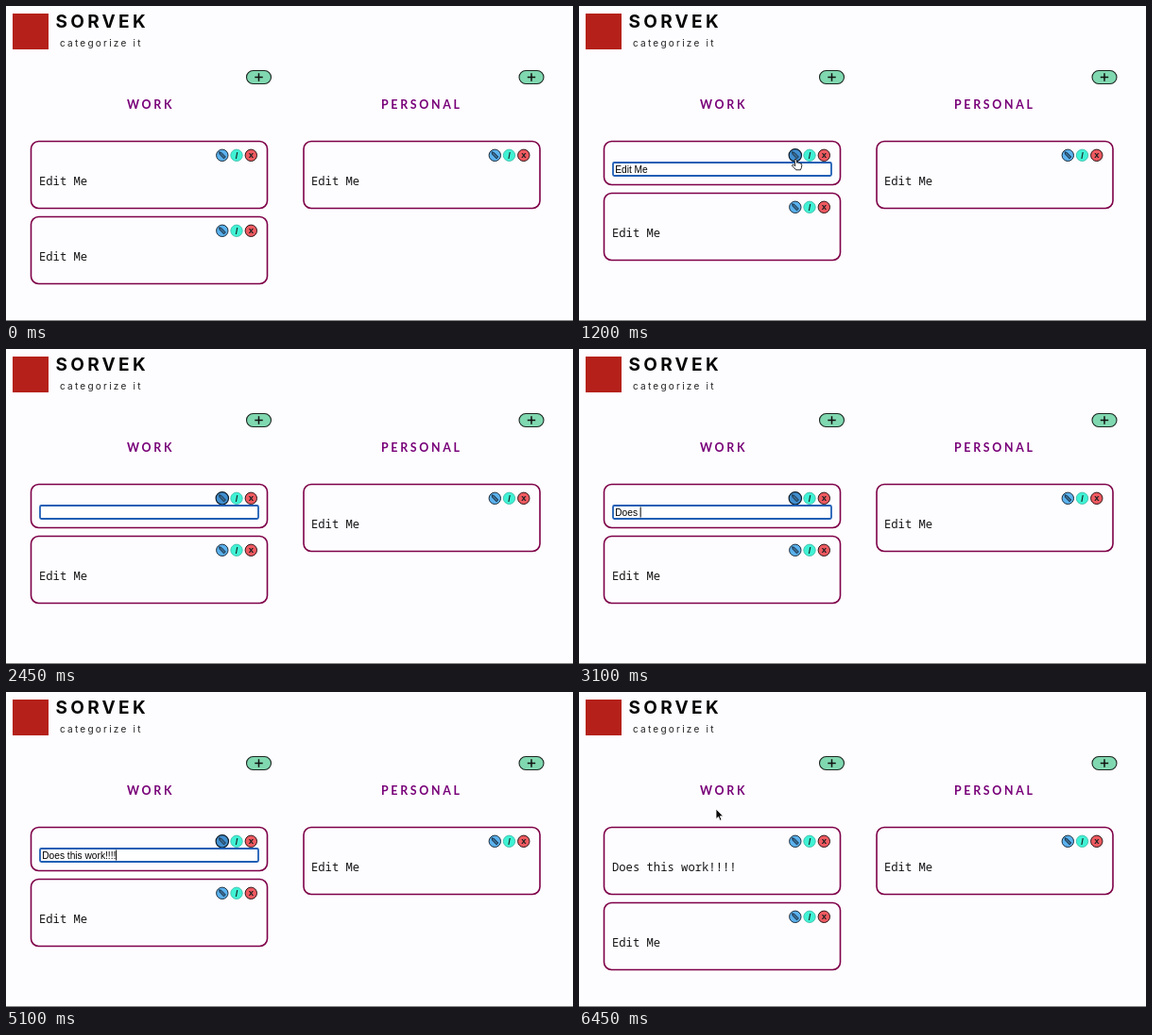
An HTML page for the animation above (6.5 s loop, 600 by 334 pixels).

```html
<!DOCTYPE html>
<html lang="en">
<head>
<meta charset="utf-8">
<title>Card board</title>
<style>
  html, body { margin: 0; height: 100%; overflow: hidden; background: #fdfcff; }
  svg { display: block; width: 600px; height: 334px; }
  .title { font: 700 19px Inter, sans-serif; letter-spacing: 3.3px; fill: #080808; }
  .tagline { font: 400 10px Inter, sans-serif; letter-spacing: 2.25px; fill: #222; }
  .heading { font: 700 12.4px Lato, sans-serif; letter-spacing: 2.7px; fill: #780078; }
  .note { font: 12.2px "Noto Sans Mono", monospace; fill: #161616; white-space: pre; }
  .typed { font: 10.2px "Liberation Sans", Arial, sans-serif; fill: #000; white-space: pre; }
  .icon { font: 700 9.5px "Liberation Sans", Arial, sans-serif; text-anchor: middle; fill: #182020; }
  .frame { fill: none; stroke: #7e0048; stroke-width: 1.6; }
</style>
</head>
<body>
<svg viewBox="0 0 600 334">
  <defs>
    <g id="add">
      <rect x=".5" y=".5" width="26" height="14" rx="7" fill="#80d8b0" stroke="#1c2622" stroke-width="1.1"/>
      <path d="M9.3 7.5h8.4M13.5 3.3v8.4" stroke="#111" stroke-width="1.5"/>
    </g>
    <g id="pencil">
      <path d="M-3.2-3.4L-2.6-1.2L2-.1" fill="none"/>
      <path d="M-3.3-3.6L-.8-2.9L3.6 1.7L1.7 3.6L-2.7-1Z" fill="#39698c" stroke="#14263a" stroke-width=".8"/>
    </g>
    <g id="tools">
      <circle r="6.2" fill="#5bb2ee" stroke="#1b2c3a"/>
      <use href="#pencil"/>
      <circle cx="15.2" r="6.2" fill="#40f2d4" stroke="#37b9a5" stroke-width=".8"/>
      <text class="icon" x="15.2" y="3.4">/</text>
      <circle cx="30.5" r="6.2" fill="#ee5a60" stroke="#2a1518"/>
      <text class="icon" x="30.5" y="2.8">x</text>
    </g>
  </defs>

  <rect x="7" y="8" width="38" height="38" fill="#b5211a"/>
  <text class="title" x="52.5" y="23">SORVEK</text>
  <text class="tagline" x="57" y="43">categorize it</text>
  <path d="M0 333.5H600" stroke="#858585"/>

  <use href="#add" x="254" y="68"/>
  <use href="#add" x="542.5" y="68"/>
  <text class="heading" x="128" y="108.5">WORK</text>
  <text class="heading" x="397" y="108.5">PERSONAL</text>

  <g transform="translate(26 143)">
    <rect id="firstFrame" class="frame" x=".5" y=".5" width="250" height="71" rx="8"/>
    <use href="#tools" x="202.8" y="15.3"/>
    <g id="active" transform="translate(202.8 15.3)">
      <circle r="6.7" fill="#418fd0" stroke="#12202c" stroke-width="1.2"/>
      <use href="#pencil"/>
    </g>
    <text id="note" class="note" x="9" y="47"></text>
    <g id="field">
      <rect x="10" y="23" width="231" height="14" rx="1.5" fill="#fff" stroke="#1f5fb5" stroke-width="1.8"/>
      <text id="typed" class="typed" x="12.2" y="33.5"></text>
      <path id="caret" d="M0 24.5v11" stroke="#000" stroke-width="1"/>
    </g>
  </g>

  <g id="second">
    <rect class="frame" x=".5" y=".5" width="250" height="71" rx="8"/>
    <use href="#tools" x="202.8" y="15.3"/>
    <text class="note" x="9" y="47">Edit Me</text>
  </g>
  <g transform="translate(314.5 143)">
    <rect class="frame" x=".5" y=".5" width="250" height="71" rx="8"/>
    <use href="#tools" x="202.8" y="15.3"/>
    <text class="note" x="8.5" y="47">Edit Me</text>
  </g>

  <g id="pointer" stroke-linejoin="round">
    <path id="hand" fill="#fff" stroke="#111" stroke-width=".9"
      d="M-.9.4Q0-.6.9.4L1.8 4Q3-.0 3.6 3.8Q5-.0 0 5.2 4.3Q6.6 3.8 6.9 5.2Q7.6 9 5.6 11.8H.4Q-1-9 0-3.9 6.8Q-3.6 5.2-2 5.9L-.2 7Z"/>
    <path id="arrow" fill="#080808" stroke="#fff" stroke-width=".8"
      d="M0 0V10.6L2.5 8.4L4.2 12.3L6 11.5L4.3 7.8H7.6Z"/>
  </g>
</svg>
<script>
const LOOP = 6500, OPEN = 1150, CLOSE = 5900;
const BEFORE = "Edit Me", AFTER = "Does this work!!!!";
const $ = id => document.getElementById(id);
const show = (id, on) => $(id).setAttribute("display", on ? "inline" : "none");
const move = (id, x, y) => $(id).setAttribute("transform", `translate(${x} ${y})`);
const clamp = (v, lo, hi) => Math.min(hi, Math.max(lo, v));
const ease = (t, from, to) => {
  const p = clamp((t - from) / (to - from), 0, 1);
  return p * p * (3 - 2 * p);
};
const steps = (t, start, gap) => Math.max(0, Math.floor((t - start) / gap) + 1);

$("hand").setAttribute("d",
  "M-1 1Q0-.8 1 1L1.7 4.4Q3 3 3.6 4.6Q5 3.8 5.3 5.2Q6.8 4.8 6.8 6.4Q6.8 9.6 5.4 11.8H.6Q-1.4 9.4-3.6 7.3Q-3.4 5.6-1.8 6.4L-.2 7.6Z");

function valueAt(t) {
  if (t < 2480) return BEFORE.slice(0, Math.max(0, BEFORE.length - steps(t, 1500, 140)));
  return AFTER.slice(0, steps(t, 2500, 140));
}

function pointerAt(t) {
  if (t < 1480) {
    const p = ease(t, 550, 800);
    return [262 - 33 * p, 190 - 28 * p];
  }
  const p = ease(t, 5450, 5750), drift = ease(t, 5900, 6100);
  return [229 - 83 * p - drift, 162 - 38 * p];
}

function draw(t) {
  const editing = t >= OPEN && t < CLOSE;
  const [x, y] = pointerAt(t);
  const hovering = Math.hypot(x - 229, y - 158) < 7;

  $("firstFrame").setAttribute("height", editing ? 46 : 71);
  move("second", 26, editing ? 198 : 223);
  show("field", editing);
  show("note", !editing);
  show("active", hovering && t >= 550);
  $("note").textContent = t < OPEN ? BEFORE : AFTER;

  if (editing) {
    $("typed").textContent = valueAt(t);
    move("caret", 12.5 + $("typed").getComputedTextLength(), 0);
    show("caret", (t + 300) % 1000 < 500);
  }

  show("pointer", t >= 550 && t < 1480 || t >= 5450);
  move("pointer", x, y);
  show("hand", hovering);
  show("arrow", !hovering);
}

function tick() {
  draw(performance.now() % LOOP);
  requestAnimationFrame(tick);
}
tick();
</script>
</body>
</html>
```
